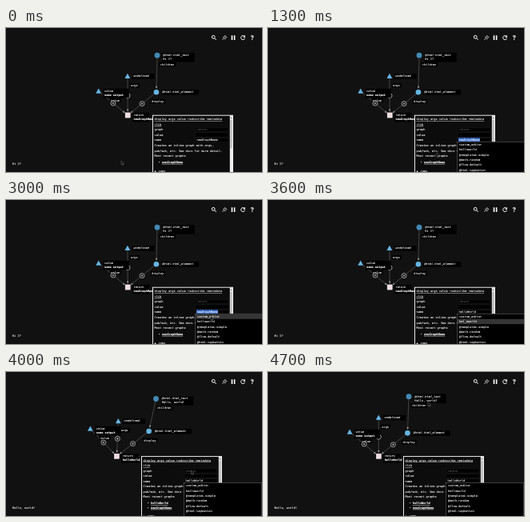
Recreate the animation shown at these times as an HTML page. Size 320 px wide and 180 px high, loop 4800 ms.

```html
<!DOCTYPE html>
<html lang="en">
<head>
<meta charset="utf-8">
<title>Graph editor</title>
<style>
html, body { margin: 0; width: 100%; height: 100%; overflow: hidden; background: #111; }
svg { display: block; width: 100vw; height: 100vh; }
text {
  font: 3.62px "DejaVu Sans Mono", "Liberation Mono", monospace;
  color: #fff; fill: currentColor; stroke: currentColor; stroke-width: .08;
  white-space: pre; text-rendering: geometricPrecision;
}
.i { font-style: italic; }
.b { font-weight: bold; }
.u { text-decoration: underline; }
.dim { color: #555; }
.edge { stroke: #666; stroke-width: .6; fill: none; }
.plus { fill: #111; stroke: #e4e4e4; stroke-width: .65; }
.icon { fill: none; stroke: #fff; stroke-width: 1; }
</style>
</head>
<body>
<svg viewBox="0 0 320 180">
  <rect width="320" height="180" fill="#111"/>
  <g class="icon">
    <circle cx="259.2" cy="11.3" r="1.9"/><path d="M260.5 12.6l2.2 2.3"/>
    <path d="M270.4 14.8l2-2M273.6 9.4l2.4 2.4M273.9 9.9l-1.4 1.6M275.6 11.5l-1.5 1.5M271.2 11l3.2 3.2" stroke-width=".8"/>
    <path d="M282.5 9.2v5.8M285.6 9.2v5.8" stroke-width="1.6"/>
    <path d="M298 10.4a2.5 2.5 0 1 0 .6 2.3"/><path d="M299 8.8v2.9h-2.9z" fill="#fff" stroke="none"/>
  </g>
  <text x="305.8" y="15" style="font:bold 8px Roboto,sans-serif">?</text>
  <text id="out" x="8" y="171.3"></text>
  <g id="graph"></g>
  <g id="panel">
    <rect x="183.5" y="109.2" width="100" height="90" fill="#0c0c0c" stroke="#fff" stroke-width=".9"/>
    <rect x="279.8" y="109.2" width="3.7" height="90" fill="#eee"/>
    <path d="M280.6 112.8l1-1.4 1 1.4z" fill="#333"/>
    <rect x="280.4" y="114.5" width="2.2" height="36" fill="#bbb"/>
    <g id="rows"></g>
    <g id="menu">
      <rect x="236.6" y="142.2" width="97" height="60" fill="#000" stroke="#777" stroke-width=".5"/>
      <rect id="hover" x="237" width="96.4" height="6.4" fill="#353535"/>
    </g>
  </g>
  <path id="cursor" d="M0 0v4.6l1.1-1 .8 1.8.8-.4-.8-1.7h1.5z" fill="#000" stroke="#999" stroke-width=".4"/>
</svg>
<script>
const $ = id => document.getElementById(id);
const LOOP = 4800, STEP = 100, CHAR = 2.18;
const OPENED = 600, PICKED = 3500, RENAMED = 3700;

function add(parent, tag, attrs = {}, content = '') {
  const el = document.createElementNS('http://www.w3.org/2000/svg', tag);
  for (const k in attrs) el.setAttribute(k, attrs[k]);
  el.textContent = content;
  return parent.appendChild(el);
}
const group = parent => add(parent, 'g');
const write = (parent, x, y, str, cls = '') =>
  add(parent, 'text', { x, y: y + 1.3, class: cls }, str);
const place = (el, [x, y]) => el.setAttribute('transform', `translate(${x} ${y})`);
const show = (el, on) => el.setAttribute('visibility', on ? 'inherit' : 'hidden');
const mix = (p, q, k) => p.map((v, i) => v + (q[i] - v) * k);

const graph = $('graph');
const [edgeLayer, tagLayer, plusLayer, nodeLayer] = Array.from({ length: 4 }, () => group(graph));

// rest: offset from the root; jolt: displacement right after the graph is rebuilt
function node(rest, jolt, shape, attrs, lines) {
  const g = group(nodeLayer);
  const top = lines.length > 1 ? -3.2 : -3;
  const width = Math.max(...lines.map(l => l[0].length)) * CHAR + 8;
  add(g, 'rect', { x: 6, y: top, width, height: lines.length * 5 + 1.5, fill: '#000' });
  add(g, shape, attrs);
  const texts = lines.map(([str, cls], i) => write(g, 7.3, i * 5 - .5, str, cls));
  return { g, texts, rest, jolt };
}
const triangle = { d: 'M0 -3.5L3.4 2.8H-3.4z', fill: '#66b5e3' };
const message = node([36.8, -74.8], [26.5, 6.5], 'circle', { r: 3.4, fill: '#4389b4' },
  [['@html.html_text', 'i'], ['', '']]);
const undef = node([-.3, -48.7], [4.8, 10.5], 'path', triangle, [['undefined', 'i']]);
const value = node([-36.5, -30], [7.5, -9.5], 'path', triangle, [['value', 'i'], ['some output', 'b']]);
const element = node([35.7, -28.8], [9.8, -5.5], 'circle', { r: 3.3, fill: '#66b5e3' },
  [['@html.html_element', 'i']]);
const root = node([0, 0], [0, 0], 'rect',
  { x: -3.1, y: -3.1, width: 6.2, height: 6.2, fill: '#f3dde1', stroke: '#fff', 'stroke-width': .4 },
  [['return', ''], ['', 'b']]);
const nodes = [message, undef, value, element, root];

const links = [
  [message, element, 'children', 4],
  [undef, root, 'args', 4],
  [value, root, 'value', 2],
  [element, root, 'display', 7.7]
].map(([from, to, name, shift]) => {
  const tag = group(tagLayer);
  add(tag, 'rect', { x: -1, y: -2.6, width: name.length * CHAR + 3, height: 5.4, fill: '#000' });
  write(tag, 0, 0, name);
  return {
    from, to, tag, shift,
    line: add(edgeLayer, 'path', { class: 'edge' }),
    head: add(edgeLayer, 'path', { d: 'M0 0l-3 1.2v-2.4z', fill: '#999' }),
    plus: to === root && add(plusLayer, 'path', {
      class: 'plus', d: 'M-3 0a3 3 0 1 0 6 0a3 3 0 1 0 -6 0M-1.3 0h2.6M0 -1.3v2.6'
    })
  };
});

const rows = $('rows'), LEFT = 185.5, FIELD = 238.5;
const rowY = i => 113.9 + i * 6.55;
for (const i of [2, 3, 4])
  add(rows, 'rect', { x: 237, y: rowY(i) - 2.7, width: 41, height: 5.4, fill: '#020202', stroke: '#222', 'stroke-width': .4 });
[
  'display args value +subscribe +metadata', '+lib', 'graph', 'value', 'name',
  'Creates an inline graph with args,', 'pub/sub, etc. See docs for more detail.', 'Most recent graphs'
].forEach((str, i) => write(rows, LEFT, rowY(i), str, i < 2 ? 'u' : ''));
write(rows, FIELD, rowY(2), 'return', 'dim');
const selection = add(rows, 'rect', { x: 238, y: 137.2, width: 27, height: 5, fill: '#3568c4' });
const nameField = write(rows, FIELD, 139.8, '');
const recent = [0, 1].map(i => {
  const g = group(rows), y = 167.6 + i * 5.4;
  write(g, 190.5, y, '•');
  return { g, label: write(g, 195, y, 'newGraphName', 'u b') };
});
const foot = group(rows);
write(foot, LEFT, 178.3, '▲');
write(foot, 190.5, 178.3, 'copy', 'u');

const menu = $('menu'), hover = $('hover');
['custom_editor', 'helloworld', '@templates.simple', '@math.random', '@flow.default', '@html.tapbutton']
  .forEach((str, i) => write(menu, 239, 145.5 + i * 6.4, str));

// start, duration, destination
const moves = [
  [100, 400, [254, 139]], [800, 500, [211, 156]], [2400, 600, [256, 145]],
  [3000, 500, [245, 149]], [3800, 400, [218, 97]], [4200, 500, [200, 38]]
];
function cursorAt(t) {
  return moves.reduce((p, [start, length, goal]) => {
    const k = Math.min(Math.max((t - start) / length, 0), 1);
    return mix(p, goal, k * k * (3 - 2 * k));
  }, [144, 166]);
}

function drawGraph(t) {
  const origin = t < RENAMED ? [152.2, 109] : [138.4, 105.3];
  const sway = t < RENAMED ? 0 : Math.exp(-Math.max(t - 3800, 0) / 260);
  for (const n of nodes) {
    n.pos = origin.map((v, i) => v + n.rest[i] + n.jolt[i] * sway);
    place(n.g, n.pos);
  }
  for (const { from, to, tag, shift, line, head, plus } of links) {
    const p = from.pos, q = to.pos;
    const dx = q[0] - p[0], dy = q[1] - p[1];
    const end = mix(p, q, 1 - 4.4 / Math.hypot(dx, dy));
    line.setAttribute('d', `M${p}L${end}`);
    head.setAttribute('transform', `translate(${end}) rotate(${Math.atan2(dy, dx) * 180 / Math.PI})`);
    place(tag, [p[0] + dx / dy * 11 + shift, p[1] + 11.3]);
    if (plus) place(plus, mix(p, q, .5));
  }
}

function draw(t) {
  const renamed = t >= RENAMED, picked = t >= PICKED, opened = t >= OPENED;
  const greeting = renamed ? 'Hello, world!' : 'Hi 2?';
  const name = renamed ? 'helloWorld' : 'newGraphName';
  drawGraph(t);

  $('out').textContent = message.texts[1].textContent = greeting;
  root.texts[1].textContent = recent[0].label.textContent = name;
  nameField.textContent = picked ? 'helloWorld' : 'newGraphName';

  place($('panel'), renamed ? [-14, -3.6] : [0, 0]);
  place(foot, [0, renamed ? 5.4 : 0]);
  show(recent[1].g, renamed);
  show(selection, opened && !picked);
  show(menu, opened);
  show(hover, t >= 2900 && t < 4000);
  hover.setAttribute('y', t < 3200 ? 142.4 : 148.8);
  place($('cursor'), cursorAt(t));
}

const start = performance.now();
function tick() {
  const t = (performance.now() - start) % LOOP;
  draw(Math.floor(t / STEP) * STEP);
  requestAnimationFrame(tick);
}
tick();
</script>
</body>
</html>
```
